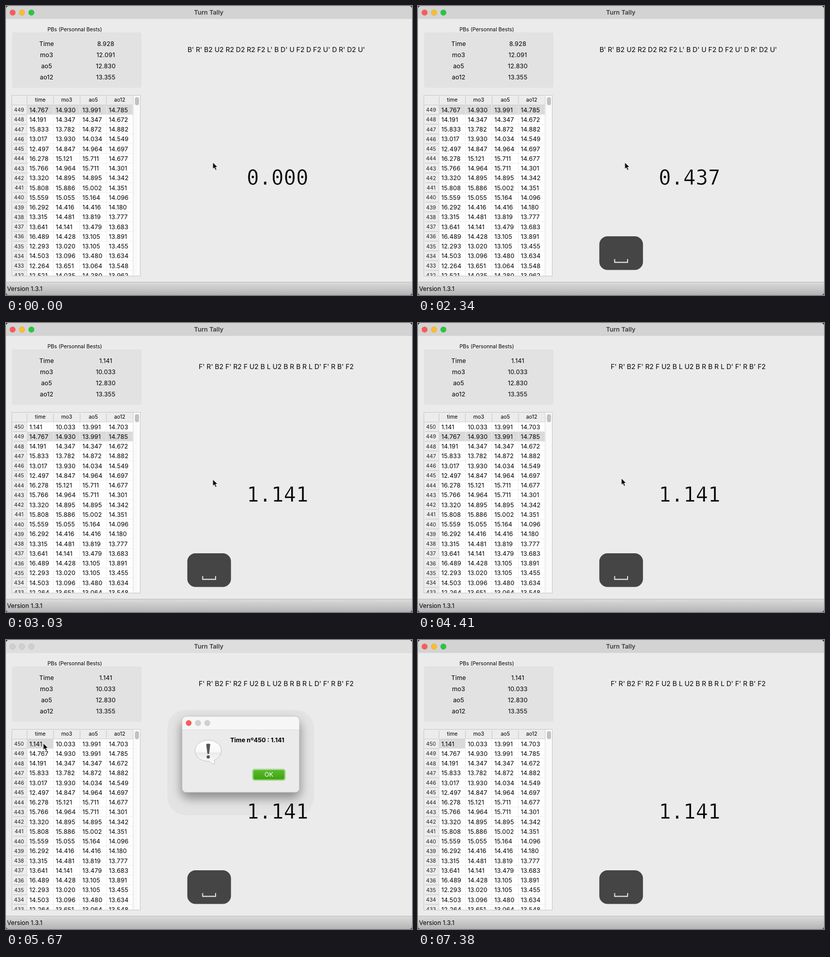
Recreate the animation shown at these times as an HTML page. Size 800 by 571 pixels, loop 7.95 s.

```html
<!DOCTYPE html>
<html lang="en">
<head>
<meta charset="utf-8">
<title>Turn Tally</title>
<style>
  html, body { margin: 0; width: 100%; height: 100%; overflow: hidden; background: #48507c; }
  svg { display: block; width: 100vw; height: 100vh; font-family: Inter, "Open Sans", sans-serif; font-size: 12.2px; }
  text { white-space: pre; }
  .mid { text-anchor: middle; }
  .small { font-size: 10.3px; }
  .bold { font-weight: 600; }
  .num { letter-spacing: .1px; }
  /* the background-coloured outline thins the strokes */
  .clock { font: 40.4px "DejaVu Sans Mono", monospace; stroke: #ebebeb; stroke-width: .6; }
  .off { display: none; }
  .light { stroke: #0002; stroke-width: .6; }
  .inactive .bar { fill: #dedede; }
  .inactive .lights circle { fill: #cfcfcf; }

  #key, #dialog, #cursor { animation: 7950ms linear infinite; }
  #key { animation-name: key; }
  #dialog { animation-name: dialog; }
  #cursor { animation-name: cursor; animation-timing-function: ease-in-out; }
  @keyframes key {
    0%, 20.75% { opacity: 0; }
    20.751%, 100% { opacity: 1; }
  }
  @keyframes dialog {
    0%, 69.06% { opacity: 0; }
    70.19%, 86.04% { opacity: 1; }
    86.8%, 100% { opacity: 0; }
  }
  @keyframes cursor {
    0%, 54.72% { transform: translate(407.5px, 309px); }
    62.26%, 72.33% { transform: translate(73.5px, 204px); }
    79.87%, 87.17% { transform: translate(509.5px, 262.5px); }
    92.8%, 100% { transform: translate(812px, 330px); }
  }
</style>
</head>
<body>
<svg id="app" viewBox="0 0 800 571" preserveAspectRatio="none">
  <defs>
    <linearGradient id="status" x2="0" y2="1">
      <stop offset="0" stop-color="#dcdcdc"/><stop offset="1" stop-color="#b4b4b4"/>
    </linearGradient>
    <linearGradient id="bubble" x2="0" y2="1">
      <stop offset="0" stop-color="#fff"/><stop offset=".5" stop-color="#f8f8f8"/>
      <stop offset=".52" stop-color="#e9e9e9"/><stop offset="1" stop-color="#fff"/>
    </linearGradient>
    <linearGradient id="green" x2="0" y2="1">
      <stop offset="0" stop-color="#58bb2c"/><stop offset="1" stop-color="#3fa40f"/>
    </linearGradient>
    <filter id="blur" x="-30%" y="-30%" width="160%" height="170%"><feGaussianBlur stdDeviation="10"/></filter>
    <clipPath id="win"><rect width="800" height="571" rx="6"/></clipPath>
    <clipPath id="body"><rect x="12" y="195.5" width="239" height="337.5"/></clipPath>
  </defs>

  <rect width="800" height="30" fill="#2c2c34"/>
  <g clip-path="url(#win)">
    <rect width="800" height="571" fill="#ebebeb"/>
    <rect class="bar" width="800" height="25.5" fill="#d3d3d3"/>
    <path d="M0 25.5H800" stroke="#dedede"/>
    <g class="lights">
      <circle class="light" cx="13" cy="13" r="5.7" fill="#fc5b57"/>
      <circle class="light" cx="31.5" cy="13" r="5.7" fill="#fdbc2e"/>
      <circle class="light" cx="50" cy="13" r="5.7" fill="#27c840"/>
    </g>
    <text class="mid bold" x="399.5" y="17.2" fill="#3c3c3c">Turn Tally</text>

    <text class="mid small" x="135.5" y="50">PBs (Personnal Bests)</text>
    <rect x="12" y="52" width="255" height="109.5" rx="4" fill="#e2e2e2"/>
    <g id="bests" class="mid num"></g>

    <text id="scramble" class="mid" x="532.5" y="90.5" font-size="13.3"></text>
    <text id="clock" class="clock mid" x="535" y="352.5">0.000</text>

    <rect x="11.5" y="176.5" width="253" height="357" fill="#fff" stroke="#c6c6c6"/>
    <rect x="12" y="177" width="239" height="18.5" fill="#ececec"/>
    <rect x="12" y="195" width="29.5" height="338" fill="#ececec"/>
    <g clip-path="url(#body)"><g id="rows"></g></g>
    <g id="heads" class="mid small"></g>
    <path d="M41.5 195V533" stroke="#d4d4d4"/>
    <path d="M12 195.5H251" stroke="#d0d0d0"/>
    <rect x="251" y="177" width="13" height="356" fill="#fafafa"/>
    <path d="M251 177V533" stroke="#e4e4e4"/>
    <rect x="254" y="180" width="8" height="16" rx="4" fill="#c1c1c1"/>

    <rect y="545" width="800" height="26" fill="url(#status)"/>
    <path d="M0 545.5H800" stroke="#b9b9b9"/>
    <text x="2" y="562.7">Version 1.3.1</text>

    <g id="key">
      <rect x="357.3" y="455" width="86" height="66.5" rx="16" fill="#454545"/>
      <path d="M387.5 500v6.5h25.5v-6.5" fill="none" stroke="#eee" stroke-width="1.8"/>
    </g>

    <g id="dialog">
      <rect x="318" y="138" width="289" height="208" rx="36" fill="#000" opacity=".03"/>
      <rect x="345" y="160" width="235" height="153" rx="14" fill="#000" opacity=".38" filter="url(#blur)"/>
      <rect x="347" y="151" width="231" height="150" rx="8" fill="#ebebeb" stroke="#bdbdbd" stroke-width=".8"/>
      <path d="M347.4 177.5V159a7.6 7.6 0 0 1 7.6-7.6H570a7.6 7.6 0 0 1 7.6 7.6V177.5Z" fill="#f6f6f6"/>
      <path d="M347.5 177.5H577.5" stroke="#dadada"/>
      <circle class="light" cx="360" cy="164" r="5.5" fill="#fc5b57"/>
      <circle class="light" cx="378.3" cy="164" r="5.5" fill="#d0d0d0"/>
      <circle class="light" cx="396.6" cy="164" r="5.5" fill="#d0d0d0"/>
      <path d="M398.5 198c14.5 0 25.8 9 25.8 21 0 8-5.5 15-14 18.5.2 3 .6 5 .2 8-4-1-7.500-3-9.500-6-17 .8-28.500-8.500-28.500-20.500s11.500-21 26-21Z" fill="url(#bubble)" stroke="#b8b8b8" stroke-width=".9"/>
      <path d="M394.5 206q4-2.600 8 0l-2.400 19h-3.200Z" fill="#555"/>
      <circle cx="398.5" cy="231" r="3.200" fill="#555"/>
      <text class="mid" font-weight="700" font-size="12.2" x="495" y="202.3">Time nº450 : 1.141</text>
      <rect x="485" y="254.5" width="66" height="23.5" rx="5" fill="#a2d58f"/>
      <rect x="487.5" y="257" width="61" height="18.5" rx="3" fill="url(#green)"/>
      <text class="mid" x="518" y="270.2" fill="#fff">OK</text>
    </g>
  </g>
  <g id="cursor">
    <path d="M0 0V13.2L3 10.4 5.2 15.4 7.6 14.3 5.4 9.5H9.4Z" fill="#000" stroke="#fff" stroke-width=".9"/>
  </g>
</svg>

<script>
const LOOP = 7950, STEP = 30;
const READY = 1650, START = 1903, STOP = 3030, SELECT = 5310, OPEN = 5520, CLOSE = 6870;
const PITCH = 19.25, TOP = 195.6;
const COLS = [42, 94, 146.5, 198.5];
const SCRAMBLES = [
  "B' R' B2 U2 R2 D2 R2 F2 L' B D' U F2 D F2 U' D R' D2 U'",
  "F' R' B2 F' R2 F U2 B L U2 B R B R L D' F' R B' F2"
];
const SOLVES = `1.141 10.033 13.991 14.703
14.767 14.930 13.991 14.785
14.191 14.347 14.347 14.672
15.833 13.782 14.872 14.882
13.017 13.930 14.034 14.549
12.497 14.847 14.964 14.697
16.278 15.121 15.711 14.677
15.766 14.964 15.711 14.301
13.320 14.895 14.895 14.342
15.808 15.886 15.002 14.351
15.559 15.055 15.164 14.096
16.292 14.416 14.416 14.180
13.315 14.481 13.819 13.777
13.641 14.141 13.479 13.683
16.489 14.428 13.105 13.891
12.293 13.020 13.105 13.455
14.503 13.096 13.480 13.634
12.264 13.651 13.064 13.548
12.521 14.035 14.280 13.962`.split("\n").map(line => line.split(" "));

const $ = id => document.getElementById(id);

function add(parent, tag, attrs, text = "") {
  const el = document.createElementNS("http://www.w3.org/2000/svg", tag);
  for (const name in attrs) el.setAttribute(name, attrs[name]);
  el.textContent = text;
  return parent.appendChild(el);
}

const bests = [["Time", "8.928"], ["mo3", "12.091"], ["ao5", "12.830"], ["ao12", "13.355"]].map(([name, value], i) => {
  const y = 79.3 + 22 * i;
  add($("bests"), "text", { x: 80, y }, name);
  return add($("bests"), "text", { x: 196.5, y }, value);
});

["time", "mo3", "ao5", "ao12"].forEach((name, i) => {
  add($("heads"), "text", { x: COLS[i] + 25.5, y: 189.3 }, name);
  add($("heads"), "path", { d: `M${COLS[i] - .5} 179V194`, stroke: "#c4c4c4" });
});
add($("heads"), "path", { d: "M250.5 179V194", stroke: "#c4c4c4" });

// The newest solve sits one row above the visible area until it is recorded.
const rowY = i => TOP + (i - 1) * PITCH;
const rowMark = add($("rows"), "rect", { x: 42, y: rowY(1), width: 209, height: PITCH, fill: "#dadada" });
const cellMark = add($("rows"), "rect", { x: 42, y: rowY(0), width: 51, height: PITCH, fill: "#dadada" });
SOLVES.forEach((solve, i) => {
  const y = rowY(i), low = y + PITCH - .5;
  add($("rows"), "path", { d: `M42 ${low}H251`, stroke: "#ececec" });
  add($("rows"), "path", { d: `M14 ${low}H40`, stroke: "#c6c6c6" });
  add($("rows"), "text", { x: 25.7, y: y + 13.4, class: "mid small", fill: "#222" }, 450 - i);
  solve.forEach((value, c) => {
    add($("rows"), "text", { x: COLS[c] + 4, y: y + 14, class: "num" }, value);
    add($("rows"), "path", { d: `M${COLS[c] + 51.5} ${y}v${PITCH}`, stroke: "#ececec" });
  });
});

function show(t) {
  const done = t >= STOP;
  const run = Math.max(0, t - START) / 1000;
  $("clock").textContent = done ? SOLVES[0][0] : run.toFixed(3);
  $("clock").setAttribute("fill", t >= READY && t < START ? "#7bd88f" : "#000");
  $("scramble").textContent = SCRAMBLES[+done];
  bests[0].textContent = done ? "1.141" : "8.928";
  bests[1].textContent = done ? "10.033" : "12.091";
  $("rows").setAttribute("transform", `translate(0 ${done ? PITCH : 0})`);
  rowMark.classList.toggle("off", t >= SELECT);
  cellMark.classList.toggle("off", t < SELECT);
  $("app").classList.toggle("inactive", t >= OPEN && t < CLOSE);
}

let begin;
function tick(now) {
  begin ??= now;
  show(Math.floor((now - begin) % LOOP / STEP) * STEP);
  requestAnimationFrame(tick);
}
show(0);
requestAnimationFrame(tick);
</script>
</body>
</html>
```
